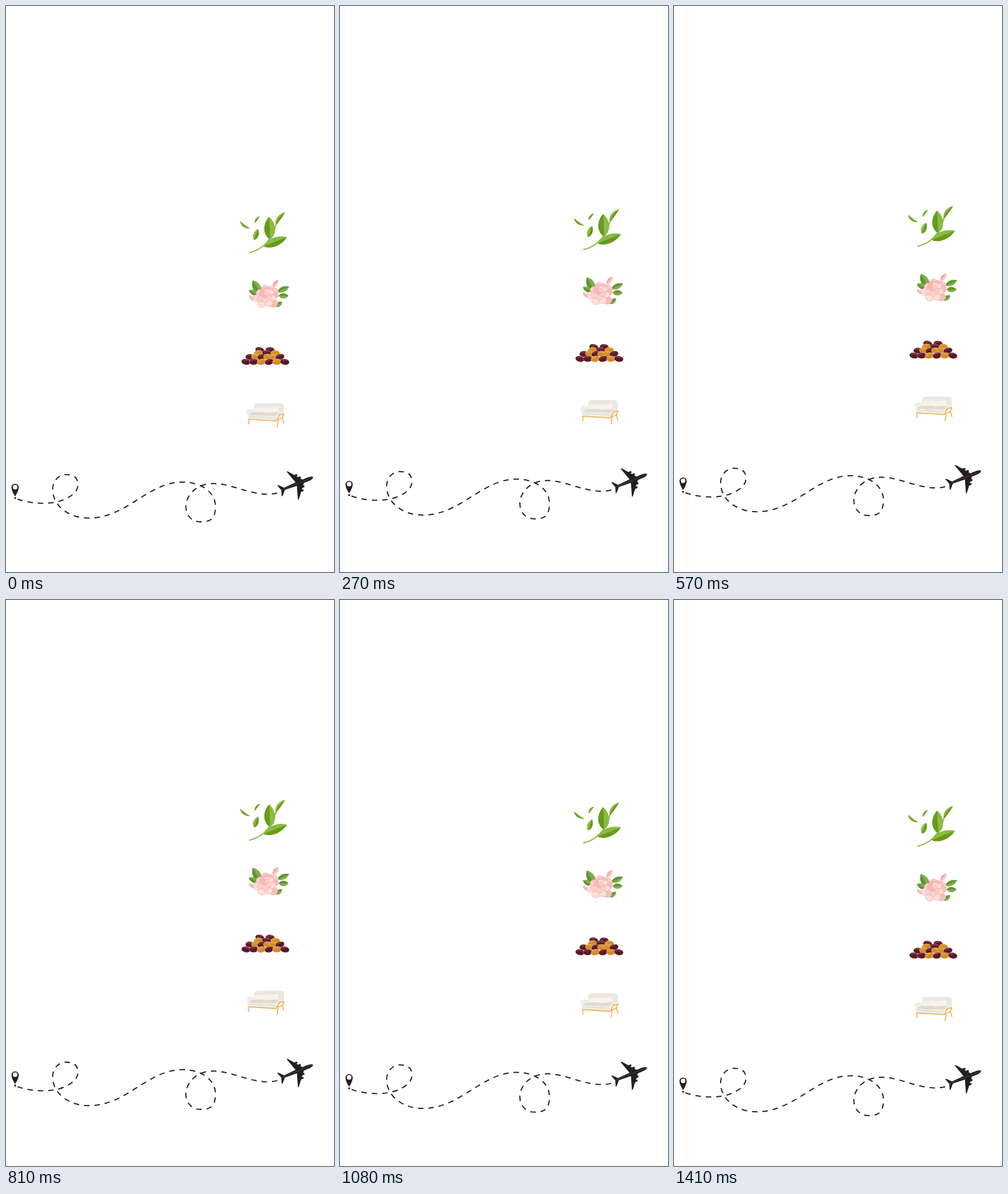
Write an HTML page that moves like this. It is 570x982 px and loops after 1.44 s.

```html
<!DOCTYPE html>
<html lang="en">
<head>
<meta charset="utf-8">
<title>Floating travel icons</title>
<style>
  html, body { margin: 0; width: 100%; height: 100%; overflow: hidden; background: #fff; }
  svg { display: block; width: 570px; height: 982px; }
  .wood { stroke: #f1ad4b; stroke-width: 1.6; }
</style>
</head>
<body>
<svg viewBox="0 0 570 982" fill="none" stroke-linejoin="round">
<g id="scene">
  <path d="M422.5 428Q445 423 458 404Q467 390 470 376" stroke="#8fc151" stroke-width="2.2"/>
  <g id="twig"></g>
  <g id="rose"></g>
  <g id="beans"></g>

  <g id="sofa">
    <path d="M430 704L432 692Q433 689 438 689H476Q483 689 483 695V707L470 712L430 711Z" fill="#ebe7e1"/>
    <path d="M418 703Q420 699 426 699Q431 700 432 706L470 708Q474 703 482 703L481 711L474 713L472 720L421 717Z" fill="#efece7"/>
    <path d="M424 707L434 703L474 705L468 711L424 710Z" fill="#dfdad2"/>
    <path d="M433 697L451 696L453 704L431 705ZM453 697L473 695L474 704L450 706Z" fill="#f8f3ea"/>
    <path d="M422 712L468 715M442 707L440 713" stroke="#d8d2c9" stroke-width=".8"/>
    <path class="wood" d="M422 726V717L470 720L475 709L483 708L480 715L471 718M480 713L483 724M473 719L471 731"/>
  </g>

  <path d="M20 855.500C38 862 62 864.500 82 861.500S125 847 125 831S114 813 103 813S81 824 81 838C81 868 110 888.500 144 888.500C210 888.500 246 826 307 826C340 826 364 844 364 868S353 895 338 895S312.500 884 312.500 868S328 828.500 360 828.500S420 847 455 847Q467 847 478 843" stroke="#231f20" stroke-width="2" stroke-dasharray="9.500 8.500"/>

  <g fill="#231f20">
    <path d="M9.500 835.300A6.300 6.300 0 0 1 22.100 835.300Q22 841 15.800 851Q9.500 841 9.500 835.300Z"/>
    <circle cx="15.800" cy="834.700" r="4" fill="#fff"/>
    <circle cx="15.900" cy="853.700" r="1.700"/>
    <g transform="translate(534 817.500) rotate(-22)">
      <g id="halfPlane">
        <path d="M0 0Q-2 3.200-10 3.200H-19L-37 25.500L-39.500 26.700L-32 3.200L-54 2L-61 9.500L-63.500 10.500L-60 0Z"/>
        <rect x="-26" y="6.500" width="6" height="3.600" rx="1.500"/>
        <rect x="-29.500" y="12.500" width="5.500" height="3.400" rx="1.500"/>
      </g>
      <use href="#halfPlane" transform="scale(1 -1)"/>
    </g>
  </g>
</g>
</svg>
<script>
const LOOP = 1440, STEP = 30, TOP_TIME = 690, RISE = 13.3;
const $ = id => document.getElementById(id);

// A leaf from base to tip; a and b bulge its two edges, the dark half lies on side b
function leaf(x0, y0, x1, y1, a, b, light = '#8abb43', dark = '#669b1c') {
  const dx = x1 - x0, dy = y1 - y0, len = Math.hypot(dx, dy);
  const at = (t, bulge) => `${x0 + dx * t - dy / len * bulge} ${y0 + dy * t + dx / len * bulge}`;
  const half = (p, q) =>
    `M${x0} ${y0}C${at(.2, p)} ${at(.7, p)} ${x1} ${y1}C${at(.7, q)} ${at(.2, q)} ${x0} ${y0}Z`;
  return `<path d="${half(a, b)}" fill="${light}"/><path d="${half((a + b) / 2, b)}" fill="${dark}"/>`;
}

$('twig').innerHTML =
  leaf(459, 405, 457.5, 366, 12.5, -12.5) + leaf(448, 417, 488, 401, -10, 10) +
  leaf(469, 380, 485, 358, -8, 1) + leaf(407, 373, 424.5, 386, .5, 6) +
  leaf(432.5, 377, 441.5, 365, -5, 0) + leaf(431, 406, 438, 387, -6, 6);

const foliage = (x0, y0, x1, y1, w) => leaf(x0, y0, x1, y1, w, -w, '#7fae4d', '#5f9433');
function roseSvg() {
  let svg = foliage(442, 499, 429, 476, 9) + foliage(439, 501, 422, 493, 6) +
    foliage(472, 496, 492, 487, 6) + foliage(474, 503, 491, 503, 6) + foliage(469, 522, 480, 513, 5) +
    leaf(464, 488, 473, 475, 5, -5, '#fac6c4', '#f5a7a9') + leaf(432, 511, 422, 502, 4, -4, '#fac6c4', '#f5b7b4');
  const petals = 18, tones = ['#fbd0cb', '#f9bcba', '#fde0d8'];
  for (let i = petals; i >= 0; i--) {
    const out = i / petals, angle = i * 2.4, reach = 16 * Math.sqrt(out), size = 4 + 4.5 * out;
    svg += `<ellipse cx="${453 + reach * Math.cos(angle)}" cy="${499 + 8 * out + reach * Math.sin(angle)}"
      rx="${size}" ry="${size * .85}" fill="${tones[i % 3]}" stroke="#f2a3a5" stroke-width=".6"/>`;
  }
  return svg;
}
$('rose').innerHTML = roseSvg();

// Rows from back to front: d is a dark bean, g a golden one
function beanRow(y, kinds, left, right) {
  return [...kinds].map((kind, i) => {
    const x = left + (right - left) * i / (kinds.length - 1);
    const [fill, shine] = kind === 'd' ? ['#5b1728', '#a4636b'] : ['#d68b21', '#f4bd60'];
    return `<g transform="translate(${x} ${y}) rotate(${15 * Math.sin(x)})">
      <ellipse rx="8" ry="5.2" fill="${fill}" stroke="#fff4e5" stroke-width=".4"/>
      <path d="M-5-1Q-2-4 3-3" stroke="${shine}" stroke-width=".8"/></g>`;
  }).join('');
}
$('beans').innerHTML = beanRow(597, 'dd', 441, 459) + beanRow(602.5, 'gdg', 438, 468) +
  beanRow(609, 'dgdggd', 424, 476) + beanRow(617.5, 'ddgdgd', 417, 484.5);

function draw(now) {
  const t = Math.floor(now % LOOP / STEP) * STEP;
  const lift = t < TOP_TIME ? t / TOP_TIME : (LOOP - t) / (LOOP - TOP_TIME);
  $('scene').setAttribute('transform', `translate(0 ${-RISE * lift})`);
  requestAnimationFrame(draw);
}
draw(0);
</script>
</body>
</html>
```
